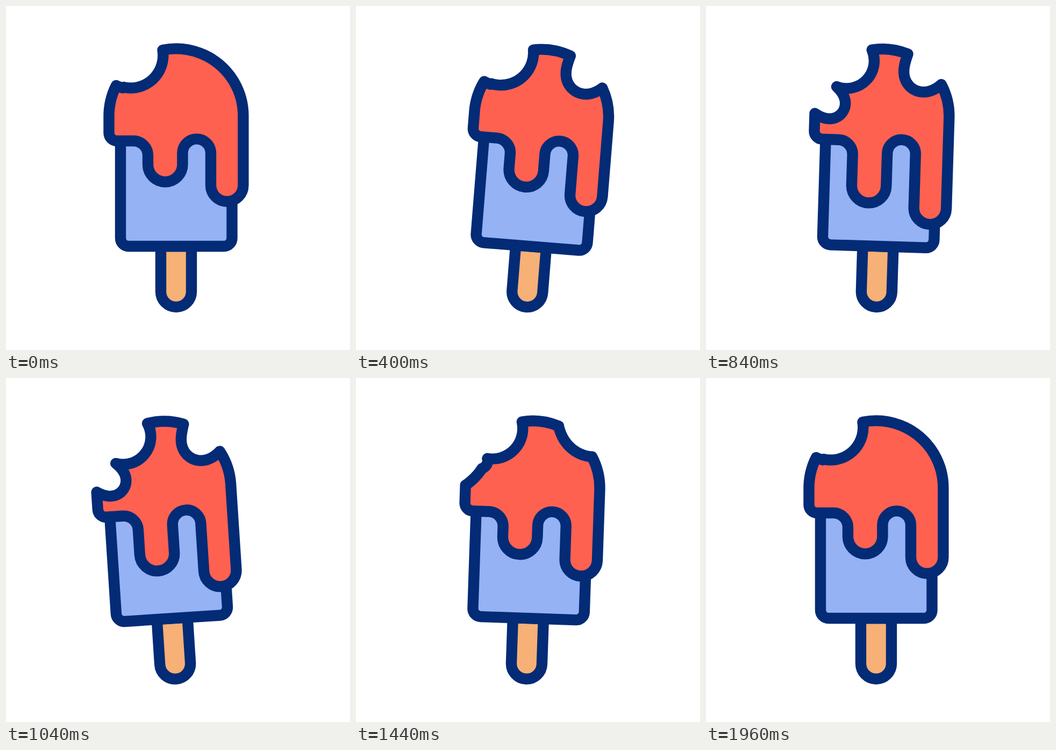
These frames come from a looping animation (640x640 px, 2000 ms). An HTML page:

```html
<!DOCTYPE html>
<html lang="en">
<head>
<meta charset="utf-8">
<title>Melting ice lolly</title>
<style>
  html, body { margin: 0; width: 100%; height: 100%; overflow: hidden; background: #fff; }
  svg { display: block; width: 100%; height: 100%; }
</style>
</head>
<body>
<svg viewBox="0 0 640 640">
  <g id="lolly" stroke="#032b76" stroke-width="20.4" stroke-linejoin="round">
    <path fill="#f7b076" d="M288 447V531.5A28.5 28.5 0 0 0 345 531.5V447Z"/>
    <path fill="#94b2f4" d="M213 230V432A15 15 0 0 0 228 447H405.5A15 15 0 0 0 420.5 432V230Z"/>
    <path id="glaze" fill="#ff6150"/>
  </g>
</svg>
<script>
const LOOP = 2000, STEP = 40, SAMPLES = 48;
const lolly = document.getElementById('lolly');
const glaze = document.getElementById('glaze');

const mix = (a, b, p) => a + (b - a) * p;

// Sine ease from 0 to 1 between two times.
function ease(t, from, to) {
  const p = Math.min(1, Math.max(0, (t - from) / (to - from)));
  return (1 - Math.cos(Math.PI * p)) / 2;
}

const pulse = (t, start, full, wane, end) => ease(t, start, full) - ease(t, wane, end);
const melt = t => 40 * pulse(t, 195, 795, 795, 1532);
const eaten = (t, start) => pulse(t, start, start + 180, 1300, 1560);

// Right, left, right, then back to rest.
const swing = t => 7.05 * ease(t, 100, 600) - 11.1 * ease(t, 600, 1095)
  + 6.2 * ease(t, 1095, 1485) - 2.15 * ease(t, 1485, 1890);

// Polar walk around a centre; a given radius flares out to meet both ends.
function arc([cx, cy], from, to, radius) {
  const angle = ([x, y]) => Math.atan2(y - cy, x - cx);
  const reach = ([x, y]) => Math.hypot(x - cx, y - cy);
  const a = angle(from);
  let turn = angle(to) - a;
  turn = Math.atan2(Math.sin(turn), Math.cos(turn));
  if (radius && turn < 0) turn += 2 * Math.PI;
  return u => {
    const end = reach(u < 0.5 ? from : to);
    const r = radius ? mix(radius, end, Math.abs(2 * u - 1) ** 5) : end;
    return [cx + r * Math.cos(a + turn * u), cy + r * Math.sin(a + turn * u)];
  };
}

// Lines along an edge that moves from whole to bitten.
function edge(whole, bitten, p) {
  let d = '';
  for (let i = 0; i <= SAMPLES; i++) {
    const [x, y] = whole(i / SAMPLES), [bx, by] = bitten(i / SAMPLES);
    d += `L${mix(x, bx, p).toFixed(2)} ${mix(y, by, p).toFixed(2)}`;
  }
  return d;
}

const dome = [316.5, 204.5];
const rightLow = [425, 142.5], rightTop = [361, 87.7];
const leftTop = [230.5, 152.5], corner = [205, 148], leftLow = [191.5, 203.5];

const rightWhole = arc(dome, rightLow, rightTop);
const rightBite = arc([391, 121.5], rightLow, rightTop, 36);
const cornerTop = arc([232, 92], leftTop, corner);
const cornerSide = arc(dome, corner, leftLow);
const leftWhole = u => u < 0.5 ? cornerTop(u * 2) : cornerSide(u * 2 - 1);
const leftBite = arc([219, 184], leftTop, leftLow, 28.5);

function draw(t) {
  const drop = melt(t), right = eaten(t, 240), left = eaten(t, 480);
  const notch = mix(60.5, 51.5, left);
  lolly.setAttribute('transform', `rotate(${swing(t)} 316.5 560)`);
  glaze.setAttribute('d',
    `M206.5 251H237A27 27 0 0 1 264 278V${295 + drop}` +
    `A32.2 32.2 0 0 0 328.4 ${295 + drop}V273.7` +
    `A26.3 26.3 0 0 1 381 273.7V${333.5 + drop}` +
    `A30.2 30.2 0 0 0 441.4 ${333.5 + drop}V204.5` +
    `A125 125 0 0 0 ${rightLow}` +
    edge(rightWhole, rightBite, right) +
    `A125 125 0 0 0 ${mix(291.5, 294, left)} 82` +
    `A${notch} ${notch} 0 0 1 ${leftTop}` +
    edge(leftWhole, leftBite, left) +
    'V236A15 15 0 0 0 206.5 251Z');
}

const start = performance.now();
function frame() {
  const t = (performance.now() - start) % LOOP;
  draw(Math.floor(t / STEP) * STEP);
  requestAnimationFrame(frame);
}
frame();
</script>
</body>
</html>
```
